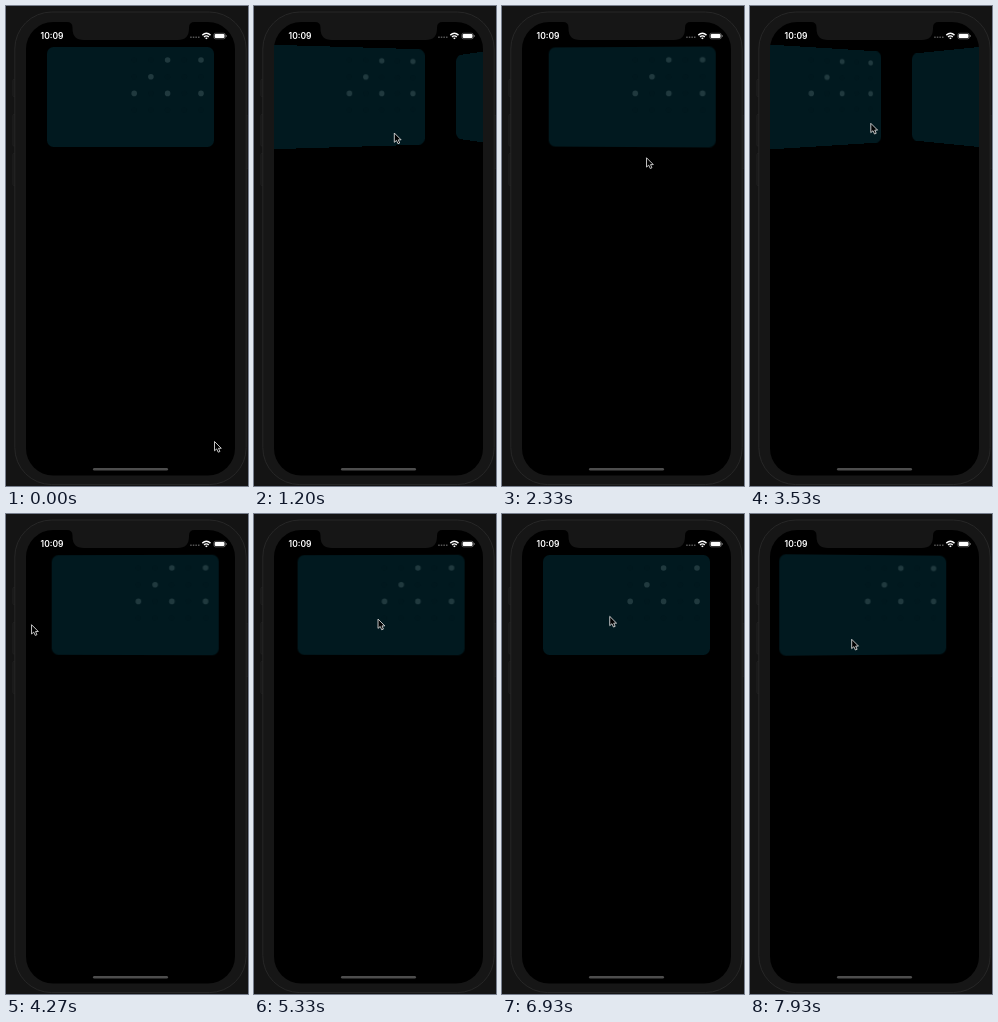
Write an HTML page that moves like this. It is 242 px wide and 480 px high and loops after 8000 ms.

```html
<!DOCTYPE html>
<html lang="en">
<head>
<meta charset="utf-8">
<title>Card carousel</title>
<style>
  html, body { margin: 0; width: 100%; height: 100%; overflow: hidden; background: #141414; }
  #stage { position: relative; width: 242px; height: 480px; overflow: hidden; }
  #stage > svg { position: absolute; left: 0; top: 0; }
  #screen { position: absolute; left: 20px; top: 36px; width: 209px; height: 414px; overflow: hidden; }
  .card { position: absolute; left: 21px; top: 5.3px; width: 167px; height: 100.4px; border-radius: 6.5px; background: #01191f; overflow: hidden; }
  .card svg { display: block; }
</style>
</head>
<body>
<div id="stage">
  <svg width="242" height="480">
    <rect width="242" height="480" fill="#141414"/>
    <g fill="#191919" stroke="#252525" stroke-width=".6">
      <rect x="6.8" y="73.5" width="3" height="17" rx="1"/>
      <rect x="6.8" y="108.5" width="3" height="31.5" rx="1"/>
      <rect x="6.8" y="147.5" width="3" height="32" rx="1"/>
      <rect x="239.4" y="109.5" width="3" height="53" rx="1"/>
    </g>
    <rect x="8.8" y="6" width="231.4" height="472.6" rx="37" fill="#161616" stroke="#272727"/>
    <rect x="20" y="16" width="209" height="453.5" rx="27"/>
    <path d="M61 15V16Q66.5 16 66.5 21.5V22.5Q66.5 34 78 34H171.5Q183 34 183 22.5V21.5Q183 16 188.5 16V15Z" fill="#161616"/>
    <text x="34.6" y="33" font-family="Inter, sans-serif" font-size="8.5" font-weight="600" fill="#fff">10:09</text>
    <path d="M184.2 31.3H194" stroke="#555" stroke-width="1.5" stroke-dasharray="1.5 1.1"/>
    <path d="M196.3 29.1Q200.4 25.5 204.5 29.1M198 30.9Q200.4 28.9 202.8 30.9" fill="none" stroke="#fff" stroke-width="1.4"/>
    <path d="M199 31.9Q200.4 31 201.8 31.9L200.4 33.3Z" fill="#fff"/>
    <rect x="207.9" y="27.3" width="11.4" height="5.5" rx="1.6" fill="none" stroke="#888" stroke-width=".6"/>
    <rect x="208.7" y="28" width="9.8" height="4.1" rx="1" fill="#fff"/>
    <rect x="219.9" y="29.1" width=".8" height="1.9" rx=".4" fill="#888"/>
    <rect x="87" y="462" width="75" height="2.6" rx="1.3" fill="#4d4d4d"/>
  </svg>
  <div id="screen"></div>
  <svg id="cursor" width="14" height="16" viewBox="-2 -2 14 16">
    <path d="M0 0V9.3L2.2 7.4L3.7 10.7L5.4 10L4 6.8H6.8Z" fill="#000" stroke="#e4e4e4" stroke-width=".85" stroke-linejoin="round"/>
  </svg>
</div>
<script>
const LOOP = 8000, TICK = 200 / 3;
const PITCH = 171, DEPTH = 205, TILT = 0.215;

// Each swipe moves one page; a higher pull means a slower start.
const swipes = [
  { start: 870, length: 1660, step: 1, pull: 1.4 },
  { start: 3070, length: 1340, step: 1, pull: 1.4 },
  { start: 5270, length: 860, step: -1, pull: 1.9 },
  { start: 6930, length: 1130, step: -1, pull: 2.25 }
];

// Pointer moves: [start, end, x, y]; it rests in between.
const home = [208.5, 435.5];
const moves = [
  [0, 600, 171.5, 131.5],
  [870, 1200, 140.3, 127],
  [1200, 1800, 84, 131],
  [1800, 2333, 144.5, 151.8],
  [2333, 2800, 181, 121.5],
  [3070, 4267, 25.5, 110.7],
  [4267, 4430, 6, 110],
  [4430, 4930, 109.5, 106],
  [5270, 5800, 231, 98.3],
  [6130, 6670, 107.4, 102.3],
  [6930, 7550, 172, 112],
  [7550, 7933, 101.7, 125.3]
];

const progress = (t, start, end) => Math.min(1, Math.max(0, (t - start) / (end - start)));

function scrollAt(t) {
  return PITCH * swipes.reduce((page, { start, length, step, pull }) => {
    const u = progress(t, start, start + length);
    return page + step * (1 - (1 - u ** pull) ** 1.93);
  }, 0);
}

function pointerAt(t) {
  return moves.reduce(([x, y], [start, end, toX, toY]) => {
    const u = progress(t, start, end);
    return [x + (toX - x) * u, y + (toY - y) * u];
  }, home);
}

function makeCard() {
  const lit = ["2,0", "4,0", "1,1", "0,2", "2,2", "4,2"];
  let dots = "";
  for (let row = 0; row < 4; row++)
    for (let col = 0; col < 5; col++) {
      const fill = lit.includes(col + "," + row) ? "#20393e" : "#01181e";
      dots += `<circle cx="${87.2 + col * 16.7}" cy="${13 + row * 16.7}" r="2.8" fill="${fill}"/>`;
    }
  const card = document.createElement("div");
  card.className = "card";
  card.innerHTML = `<svg width="167" height="100">${dots}</svg>`;
  document.getElementById("screen").append(card);
  return card;
}

const cards = Array.from({ length: 4 }, makeCard);
const cursor = document.getElementById("cursor");

function draw(time) {
  const t = Math.floor((time % LOOP + 5) / TICK) * TICK % LOOP;
  const scroll = scrollAt(t);
  cards.forEach((card, i) => {
    const x = i * PITCH - scroll;
    card.style.visibility = Math.abs(x) < 200 ? "visible" : "hidden";
    card.style.transform =
      `translateX(${x}px) perspective(${DEPTH}px) rotateY(${-x * TILT}deg)`;
  });
  const [x, y] = pointerAt(t);
  cursor.style.transform = `translate(${x - 2}px, ${y - 2}px)`;
}

const start = performance.now();
function loop() {
  draw(performance.now() - start);
  requestAnimationFrame(loop);
}
loop();
</script>
</body>
</html>
```
